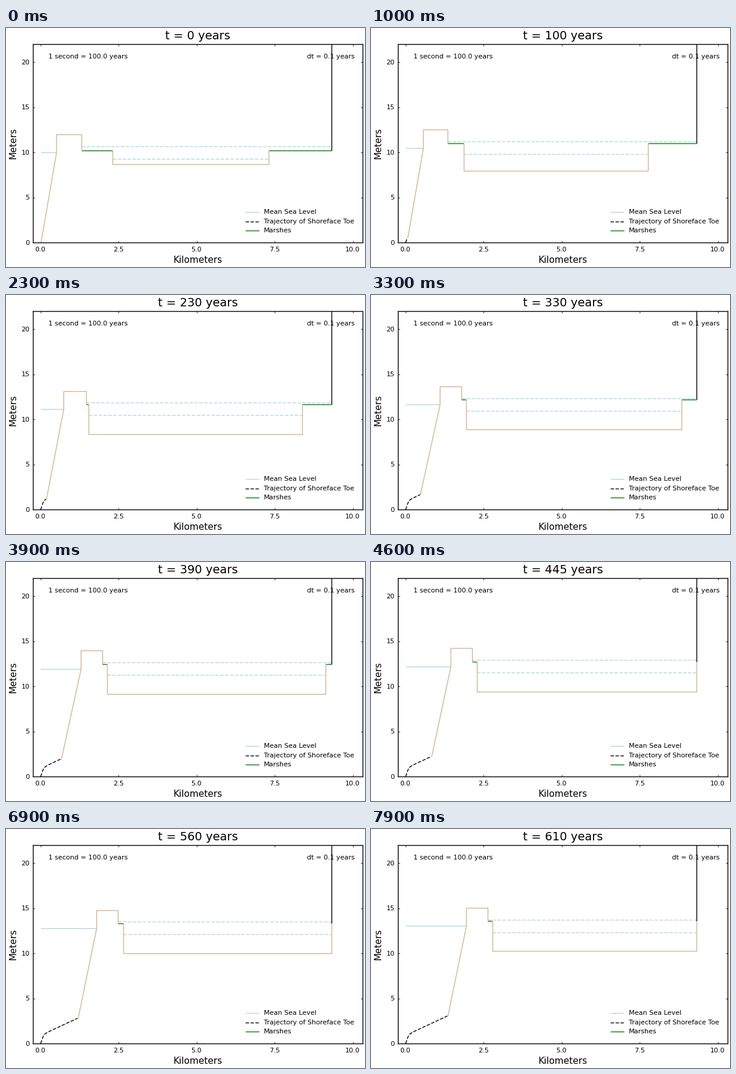
A matplotlib script for the animation above (8 s loop, 600x400 px).

```python
import numpy as np
import matplotlib.pyplot as plt
from matplotlib.animation import FuncAnimation

W, H, DPI = 600, 400, 100
FRAMES, STEP_MS = 80, 100
WALL = 9.305      # mainland edge, km
TOP = 22.0        # upper axis limit, m
RISE = 0.005      # sea level rise, m per year
TIDE = 0.7        # half the tidal range, m
SWITCH = 210      # year the back-barrier marsh drowns
MARCH = 0.00303   # steady landward migration, km per year

plt.rcParams.update({"font.family": "DejaVu Sans", "font.size": 8})


def year(n):
    """Ten years per step, five once the mainland marsh is gone."""
    return min(10 * n, 430 + 5 * (n - 43))


def edge(t, start, drift, base):
    """Slow drift until the switch, then relaxation onto steady migration."""
    if t < SWITCH:
        return start + drift * t
    gap = start + drift * SWITCH - (base + MARCH * SWITCH)
    return base + MARCH * t + gap * np.exp(-(t - SWITCH) / 36)


def toe_at(t):
    """Shoreface toe: a smooth ramp from slow to fast retreat."""
    return 0.0005 * t + 0.0026 * 20 * np.log1p(np.exp((t - 214) / 20))


def settle(t, first, last, tau):
    return last + (first - last) * np.exp(-t / tau)


fig = plt.figure(figsize=(W / DPI, H / DPI), dpi=DPI, facecolor="white")
LEFT, RIGHT, UP, DOWN = 45.3, 596.3, 27, 359
X0, KM = 57.95, 52.2   # pixel of 0 km, pixels per km
ax = fig.add_axes([LEFT / W, 1 - DOWN / H, (RIGHT - LEFT) / W, (DOWN - UP) / H])
ax.set(xlim=((LEFT - X0) / KM, (RIGHT - X0) / KM), ylim=(0, TOP),
       xticks=np.arange(0, 10.1, 2.5), yticks=range(0, 21, 5))
ax.tick_params(direction="in", length=2.2, width=0.6, top=True, right=True,
               labelbottom=False, labelleft=False)
for spine in ax.spines.values():
    spine.set_linewidth(1)
    spine.set_zorder(5)


def label(x, y, text, size=8, **kw):
    kw = {"ha": "left", "va": "baseline", **kw}
    return fig.text(x / W, 1 - y / H, text, fontsize=size, **kw)


def line(color, dashed=False, snap=True):
    style = (0, (4.1, 1.8)) if dashed else "-"
    return ax.plot([], [], color=color, ls=style, lw=1, snap=snap,
                   dash_capstyle="butt", solid_capstyle="butt")[0]


for v in ax.get_xticks():
    label(X0 + v * KM - 0.6, 374, f"{v:.1f}", ha="center")
for v in ax.get_yticks():
    label(39.5, DOWN - v / TOP * (DOWN - UP) + 3.8, f"{v:.0f}", ha="right")

title = label(320.5, 18.7, "", 14, ha="center")
label(320.5, 393.3, "Kilometers", 11, ha="center")
label(11.6, 193, "Meters", 11, ha="center", va="center", rotation=90)
label(71.2, 51, "1 second = 100.0 years")
label(582.9, 51, "dt = 0.1 years", ha="right")

sea = line("lightblue")
high = line("lightblue", True)
low = line("lightblue", True)
path = line("black", True, snap=False)
wall = line("black")
marsh = line("green")
barrier = line("tan")
basin = line("tan")

entries = [("Mean Sea Level", "lightblue", False),
           ("Trajectory of Shoreface Toe", "black", True),
           ("Marshes", "green", False)]
for k, (text, color, dashed) in enumerate(entries):
    y = 308.4 + 15.5 * k
    key = line(color, dashed)
    key.set_transform(fig.transFigure)
    key.set_clip_on(False)
    key.set_data([400 / W, 422.5 / W], [1 - y / H] * 2)
    label(431, y + 3, text)


def draw(n):
    t = year(n)
    msl = 10 + RISE * t
    ground = msl + settle(t, 0.2, 0.525, 30)
    floor = msl - settle(t, 1.3, 2.79, 54)
    toe = toe_at(t)
    shore = edge(t, 0.5, 0.00058, 0.095)
    back = edge(t, 1.3, 0.00042, 0.784)
    bay = edge(t, 2.3, -0.00432, 0.939)
    far = min(7.3 + 0.00467 * t, WALL)

    title.set_text(f"t = {t} years")
    sea.set_data([0, shore], [msl, msl])
    high.set_data([back, WALL], [msl + TIDE] * 2)
    low.set_data([bay, far], [msl - TIDE] * 2)
    past = np.arange(0, t + 1, 5.0)
    path.set_data(toe_at(past), RISE * past)
    wall.set_data([WALL, WALL], [ground, TOP])
    marsh.set_data([back, bay, np.nan, far, WALL], [ground] * 5)
    barrier.set_data([toe, shore, shore, back, back],
                     [RISE * t, msl, msl + 2, msl + 2, ground])
    basin.set_data([bay, bay, far, far], [ground, floor, floor, ground])
    return title, sea, high, low, path, wall, marsh, barrier, basin


anim = FuncAnimation(fig, draw, frames=FRAMES, interval=STEP_MS,
                     repeat=True, repeat_delay=0, blit=False)
plt.show()
```
